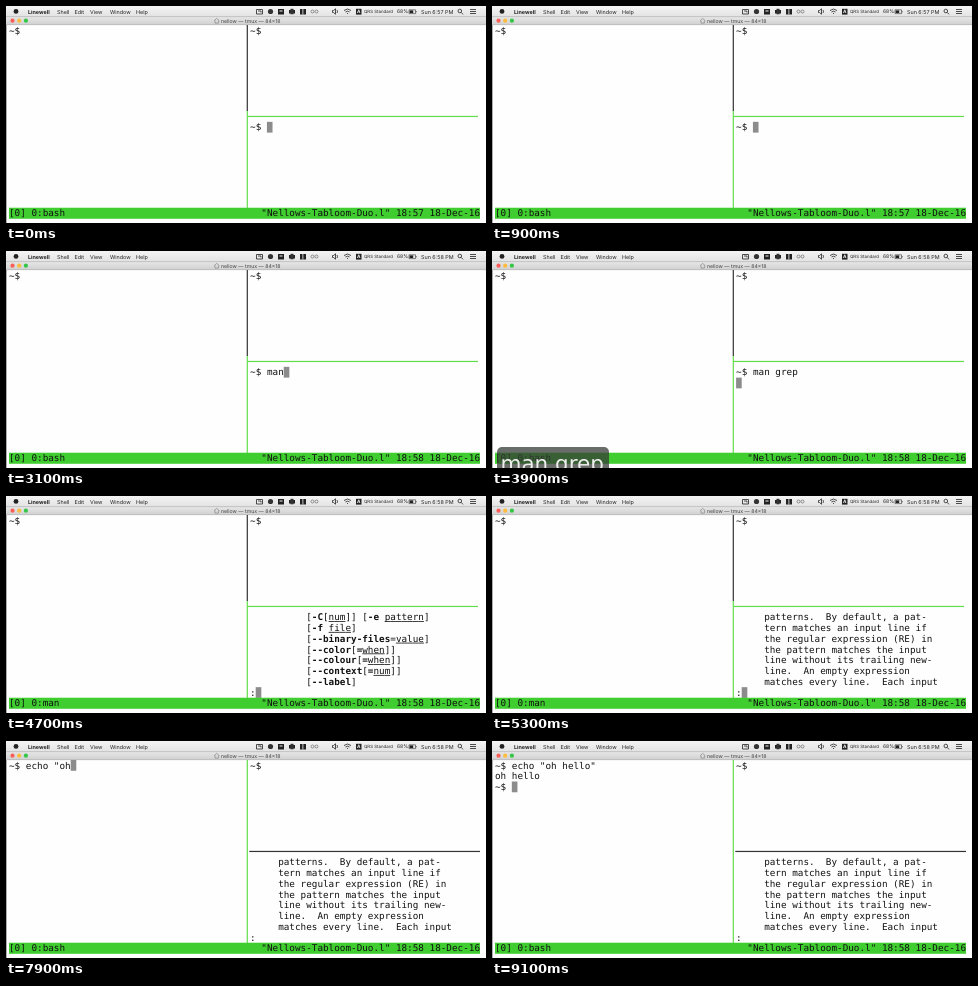
Animation, 480 px wide and 217 px high, one loop 9200 ms. Source, as an HTML page with a canvas:

```html
<!DOCTYPE html>
<html lang="en">
<head>
<meta charset="utf-8">
<title>tmux panes</title>
<style>
  html, body { margin: 0; width: 100%; height: 100%; overflow: hidden; background: #fff; }
  canvas { display: block; width: 480px; height: 217px; }
</style>
</head>
<body>
<canvas id="stage"></canvas>
<script>
const W = 480, H = 217, LOOP = 9200, STEP = 100;
const LEFT = 3, TOP = 19, CELL_W = 5.607, CELL_H = 10.76, RIGHT = 474;
const MONO = '"DejaVu Sans Mono", monospace', UI = 'Inter, sans-serif';
const GREEN = '#3fcd30', LINE = '#62de4c', INK = '#111', GREY = '#8c8c8c';
const USER = 'nellow', HOST = 'Nellows-Tabloom-Duo.l';

// Moments of the session, in ms
const AT = { minute: 1000, mouse: 1200, man: 2700, caption: 3700, enter: 3800, pager: 4100,
  scroll: 4300, pane: 6400, echo: 7100, output: 8700 };

// *bold* and _underlined_
const MANUAL = `GREP(1) General Commands Manual GREP(1)

*NAME*
     *grep*, *egrep*, *fgrep*, *zgrep*,
     *zegrep*, *zfgrep* -- file pattern
     searcher

*SYNOPSIS*
     *grep* [*-abcdDEFGHhIiJLlmnOopqRSsUV*]
          [*-A* _num_] [*-B* _num_]
          [*-C*[_num_]] [*-e* _pattern_]
          [*-f* _file_]
          [*--binary-files*=_value_]
          [*--color*[*=*_when_]]
          [*--colour*[*=*_when_]]
          [*--context*[*=*_num_]]
          [*--label*]
          [*--line-buffered*]
          [*--null*] [_pattern_]
          [_file_ _..._]

*DESCRIPTION*
     The *grep* utility searches any
     given input files, selecting
     lines that match one or more
     patterns.  By default, a pat-
     tern matches an input line if
     the regular expression (RE) in
     the pattern matches the input
     line without its trailing new-
     line.  An empty expression
     matches every line.  Each input`.split('\n');

const canvas = document.getElementById('stage');
const ctx = canvas.getContext('2d');
const ratio = window.devicePixelRatio || 1;
canvas.width = W * ratio;
canvas.height = H * ratio;
ctx.scale(ratio, ratio);
ctx.textRendering = 'geometricPrecision';

const colX = c => LEFT + c * CELL_W;
const rowY = r => TOP + r * CELL_H;

function rect(x, y, w, h, color) {
  ctx.fillStyle = color;
  ctx.fillRect(x, y, w, h);
}

function dot(x, y, r, color) {
  ctx.fillStyle = color;
  ctx.beginPath();
  ctx.arc(x, y, r, 0, 7);
  ctx.fill();
}

function stroke(path, color = '#222', width = 0.8) {
  ctx.strokeStyle = color;
  ctx.lineWidth = width;
  ctx.stroke(new Path2D(path));
}

function label(text, x, y, size = 5.4, weight = 400, color = '#222') {
  ctx.font = `${weight} ${size}px ${UI}`;
  ctx.fillStyle = color;
  ctx.fillText(text, x, y);
}

function type(text, col, row) {
  let bold = false, under = false;
  for (const ch of text) {
    if (ch === '*') { bold = !bold; continue; }
    if (ch === '_') { under = !under; continue; }
    ctx.font = `${bold ? 700 : 400} 9.31px ${MONO}`;
    ctx.fillStyle = INK;
    ctx.fillText(ch, colX(col), rowY(row) + 8.5);
    if (under) rect(colX(col), rowY(row) + 9.3, CELL_W, 0.8, INK);
    col++;
  }
}

function cursor(col, row) {
  rect(colX(col), rowY(row), CELL_W, CELL_H, GREY);
}

function typed(text, t, start, pace) {
  return text.slice(0, Math.max(0, Math.floor((t - start) / pace)));
}

function menuBar(clock) {
  const shade = ctx.createLinearGradient(0, 0, 0, 11);
  shade.addColorStop(0, '#f4f4f4');
  shade.addColorStop(1, '#e2e2e2');
  rect(0, 0, W, 11, shade);
  dot(10, 5.4, 2.4, '#222');
  label('Linewell', 22, 7.5, 5.4, 700);
  [['Shell', 51], ['Edit', 68.5], ['View', 84], ['Window', 104], ['Help', 130]]
    .forEach(([name, x]) => label(name, x, 7.5));

  stroke('M250.5 3.5h6v4.5h-6z M252 5h3v1.5');
  dot(264.5, 5.5, 2.6, '#333');
  rect(272, 3, 6, 5.5, '#222');
  rect(273.5, 4.5, 3, 1, '#eee');
  rect(283, 4, 6, 3.5, '#222');
  rect(284.5, 2.8, 3, 5.5, '#333');
  rect(294, 3, 6, 5.5, '#222');
  rect(296.5, 3, 0.8, 5.5, '#eee');
  stroke('M305 5.5a1.5 1.5 0 1 0 3 0a1.5 1.5 0 1 0 -3 0 M309 5.5a1.5 1.5 0 1 0 3 0a1.5 1.5 0 1 0 -3 0', '#555', 0.6);
  stroke('M326.5 4.5h1l2-1.7v5.4l-2-1.7h-1z M331 4q1 1.5 0 3');
  stroke('M338 4.5q3.5-3 7 0 M339.5 6q2-1.7 4 0 M341 7.5h1');
  rect(350, 2.8, 5.5, 5.8, '#222');
  label('A', 351.1, 7.4, 4.6, 700, '#fff');
  label('QRS Standard', 358, 7.2, 4.4);
  label('68%', 391, 7.4, 5);
  stroke('M403 3.8h6.5v3.8h-6.5z M410.3 5v1.4', '#333', 0.6);
  rect(403.6, 4.4, 3.6, 2.6, '#222');
  label('Sun ' + clock + ' PM', 415, 7.5);
  stroke('M452 5a1.8 1.8 0 1 0 3.6 0a1.8 1.8 0 1 0 -3.6 0 M455.2 6.4l1.8 2');
  stroke('M464 3.5h6 M464 5.5h6 M464 7.5h6');
}

function titleBar() {
  const shade = ctx.createLinearGradient(0, 11, 0, 19);
  shade.addColorStop(0, '#e6e6e6');
  shade.addColorStop(1, '#d0d0d0');
  rect(0, 10.5, W, 8.5, shade);
  rect(0, 10.4, W, 0.7, '#b4b4b4');
  rect(0, 18.5, W, 0.6, '#b0b0b0');
  ['#fb5f57', '#fcbc3d', '#35c648'].forEach((c, i) => dot(6.5 + i * 6.7, 14.7, 2.1, c));
  stroke('M208 14.8l2.7-2.4l2.7 2.4 M209 14.5v2.6h3.4v-2.6', '#777', 0.6);
  label(USER + ' — tmux — 84×18', 215, 16.7, 5.2, 400, '#444');
}

function borders(leftActive) {
  const x = colX(42.5), y = rowY(8.5);
  rect(x - 0.6, TOP, 1.2, rowY(8) - TOP, leftActive ? LINE : '#333');
  rect(x - 0.6, rowY(8), 1.2, rowY(17) - rowY(8), LINE);
  rect(x + (leftActive ? 2 : 0), y - 0.6, RIGHT - x - 2, 1.2, leftActive ? '#333' : LINE);
}

function leftPane(t) {
  const done = t >= AT.output;
  const command = typed('echo "oh hello"', t, AT.echo, 95);
  if (t >= AT.pane) done ? cursor(3, 2) : cursor(3 + command.length, 0);
  type('~$ ' + command, 0, 0);
  if (done) {
    type('oh hello', 0, 1);
    type('~$', 0, 2);
  }
}

function lowerPane(t) {
  if (t >= AT.pager) {
    const first = Math.min(25, Math.max(0, Math.floor((t - AT.scroll) / 40)));
    MANUAL.slice(first, first + 7).forEach((line, i) => type(line, 43, 9 + i));
    if (t < AT.pane) cursor(44, 16);
    type(':', 43, 16);
    return;
  }
  const command = typed('man grep', t, AT.man, 120);
  t >= AT.enter ? cursor(43, 10) : cursor(46 + command.length, 9);
  type('~$ ' + command, 43, 9);
}

function statusBar(t, minute) {
  rect(LEFT, rowY(17) - 0.2, RIGHT - LEFT, CELL_H + 0.3, GREEN);
  type(`[0] 0:${t >= AT.pager && t < AT.pane ? 'man' : 'bash'}*`, 0, 17);
  type(`"${HOST}" 18:${minute} 18-Dec-16`, 45, 17);
}

function caption(t) {
  if (t < AT.caption || t >= 4700) return;
  ctx.globalAlpha = Math.min(1, (4700 - t) / 400);
  ctx.fillStyle = 'rgba(55, 60, 55, .75)';
  ctx.beginPath();
  ctx.roundRect(5, 196, 112, 30, 5);
  ctx.fill();
  ctx.font = '21.5px "DejaVu Sans", sans-serif';
  ctx.fillStyle = '#eee';
  ctx.fillText('man grep', 8.5, 219.5);
  ctx.globalAlpha = 1;
}

function draw(t) {
  const minute = t < AT.minute ? 57 : 58;
  rect(0, 0, W, H, '#fefefe');
  menuBar('6:' + minute);
  titleBar();
  rect(0, TOP, 0.8, H - TOP, '#999');
  borders(t >= AT.pane);
  leftPane(t);
  type('~$', 43, 0);
  lowerPane(t);
  statusBar(t, minute);
  if (t >= AT.mouse && t < AT.man) {
    stroke('M326.8 129.3q1.7 0 1.7 1v4.4q0 1-1.7 1 M330.2 129.3q-1.7 0-1.7 1v4.4q0 1 1.7 1', '#444', 0.7);
  }
  caption(t);
}

function tick() {
  draw(Math.floor(performance.now() % LOOP / STEP) * STEP);
  requestAnimationFrame(tick);
}
tick();
</script>
</body>
</html>
```
